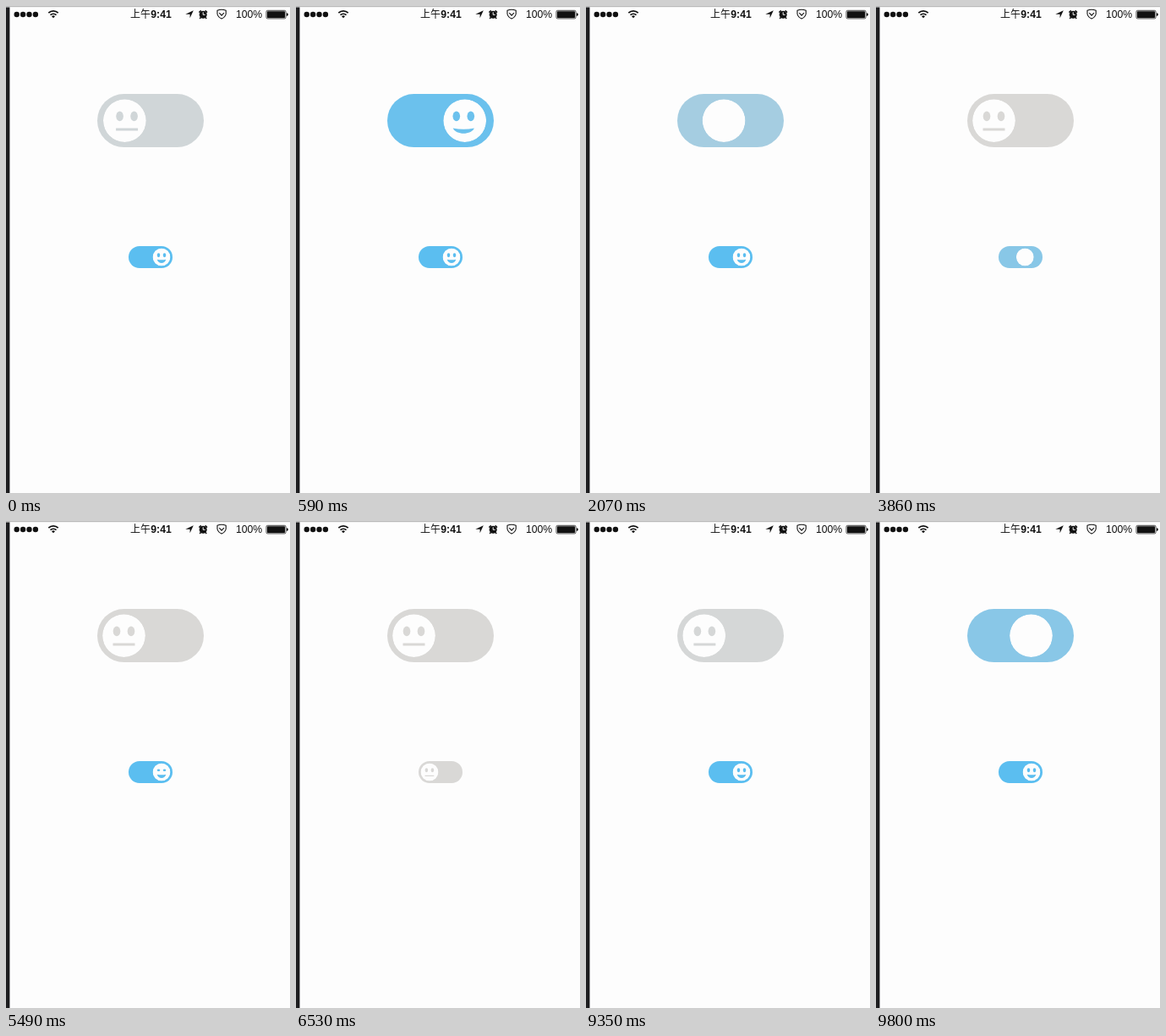
An HTML page for the animation above (9900 ms loop, 336 px wide and 576 px high).

```html
<!DOCTYPE html>
<html lang="zh">
<head>
<meta charset="utf-8">
<title>Face switches</title>
<style>
  html, body { margin: 0; width: 100%; height: 100%; overflow: hidden; background: #fdfdfd; }
  svg { display: block; width: 100%; height: 100%; }
  text { font-family: "Liberation Sans", Arial, sans-serif; font-size: 12.2px; fill: #111; }
  .cjk { font-family: "Noto Sans CJK SC", "Noto Sans CJK", sans-serif; font-size: 12px; }
  .line { fill: none; stroke: #111; }
</style>
</head>
<body>
<svg viewBox="0 0 336 576">
  <defs><clipPath id="knobClip"><circle r="25.4"/></clipPath></defs>
  <rect width="336" height="576" fill="#fdfdfd"/>
  <rect width="336" height="1.2" fill="#b9b9b9"/>
  <rect y="1.5" width="4.4" height="575" fill="#1c1c1e"/>

  <g fill="#111">
    <path d="M12.7 10h29.6" fill="none" stroke="#111" stroke-width="6.4" stroke-linecap="round" stroke-dasharray="0 7.4"/>
    <g class="line" stroke-width="1.7">
      <path d="M50.3 8.2a8.2 8.2 0 0 1 11.4 0M52.5 10.7a5 5 0 0 1 7 0"/>
    </g>
    <path d="M56 14.3l-2-2.1a2.9 2.9 0 0 1 4 0z"/>
    <text class="cjk" x="147" y="14.3">上午</text>
    <text x="171.3" y="14.2" font-weight="bold">9:41</text>
    <path d="M221.8 5.3L217.6 14.3V9.8H212.3z"/>
    <circle cx="233.2" cy="10.2" r="4.5"/>
    <path class="line" d="M228.4 7.6l2.4-2.2M238 7.6l-2.4-2.2M230.4 13.6l-1.2 1.3M236 13.6l1.2 1.3" stroke-width="1.5"/>
    <path d="M233.2 7.3v3h2.4" fill="none" stroke="#fdfdfd"/>
    <path class="line" d="M250 5.3q5-2.2 10.2 0v4.2q-.8 3.7-5.1 5.6q-4.3-1.9-5.1-5.6zM252.3 8.2l2.8 2.9l2.8-2.9" stroke-width="1.1"/>
    <text x="272" y="14.3">100%</text>
    <rect class="line" x="308" y="5.3" width="23" height="9.6" rx="1.5" stroke-width=".8"/>
    <rect x="309" y="6.3" width="21" height="7.6" rx=".6"/>
    <path d="M332 8.2q1.9.2 1.9 1.9t-1.9 1.9z"/>
  </g>
  <g id="switches"></g>
</svg>
<script>
const LOOP = 9900, STEP = 148.4, LEAD = 12;
const ON = [91, 190, 240], OFF = [217, 216, 214];
const TRAVEL = 31.5, SLIDE = 50, OVERSHOOT = 8;

// Each toggle is [start time, direction]: 1 turns on, -1 turns off.
const switches = [
  { x: 171, y: 135.6, scale: 1, duration: 740,
    toggles: [[-52, 1], [1645, -1], [9324, 1]] },
  { x: 171, y: 297, scale: 0.413, duration: 400,
    toggles: [[-2000, 1], [3714, -1], [4877, 1], [5950, -1], [7255, 1]] }
];

const clamp = v => Math.max(0, Math.min(1, v));
const ramp = (v, from, to) => clamp((v - from) / (to - from));
const ease = v => v * v * (3 - 2 * v);

function add(parent, tag, attrs = {}) {
  const node = document.createElementNS("http://www.w3.org/2000/svg", tag);
  for (const name in attrs) node.setAttribute(name, attrs[name]);
  return parent.appendChild(node);
}

function build(sw) {
  const root = add(document.getElementById("switches"), "g",
    { transform: `translate(${sw.x} ${sw.y}) scale(${sw.scale})` });
  sw.track = add(root, "rect", { x: -63, y: -31.5, width: 126, height: 63, rx: 31.5 });
  sw.knob = add(root, "g", { "clip-path": "url(#knobClip)" });
  add(sw.knob, "circle", { r: 25.4, fill: "#fdfdfd" });
  sw.face = add(sw.knob, "g");
  sw.eyes = [-8.5, 8.5].map(cx => add(sw.face, "ellipse", { cx, cy: -5.3, rx: 4.3 }));
  sw.mouth = add(sw.face, "path");
}

// The face leaves on the leading side, re-enters behind, overshoots and settles.
function faceShift(p) {
  if (p < 0.5) return SLIDE * ease(p / 0.5);
  if (p < 1) return -SLIDE + (SLIDE + OVERSHOOT) * ease((p - 0.5) / 0.5);
  return OVERSHOOT * (1 - ease(ramp(p, 1, 1.5)));
}

function mouthPath(smile) {
  if (smile === 0) return "M-13 8.9h26v3h-26z";
  const top = 11.5 - 5 * smile, depth = 2 + 8.5 * smile;
  return `M-12.6 ${top}Q0 ${top + 2.5} 12.6 ${top}` +
    `C9 ${top + depth * 4 / 3} -9 ${top + depth * 4 / 3} -12.6 ${top}z`;
}

function draw(sw, time) {
  const [start, dir] = sw.toggles.filter(([at]) => at <= time).pop();
  const p = (time - start) / sw.duration;
  const turningOn = dir > 0;
  const [from, to] = turningOn ? [OFF, ON] : [ON, OFF];
  const color = `rgb(${from.map((c, i) => Math.round(c + (to[i] - c) * clamp(p)))})`;

  const smile = turningOn ? ramp(p, 0.5, 1.25) : +(p < 0.5);
  const blink = turningOn ? Math.sin(Math.PI * ramp(p, 1.25, 1.6)) : 0;

  sw.track.setAttribute("fill", color);
  sw.face.setAttribute("fill", color);
  sw.knob.setAttribute("transform", `translate(${dir * TRAVEL * (2 * ease(clamp(p)) - 1)} 0)`);
  sw.face.setAttribute("transform", `translate(${dir * faceShift(p)} 0)`);
  sw.eyes.forEach(eye => eye.setAttribute("ry", 5.9 * (1 - 0.9 * blink)));
  sw.mouth.setAttribute("d", mouthPath(smile));
}

const origin = performance.now();
function tick() {
  const time = (performance.now() - origin) % LOOP;
  // The motion advances in held poses rather than continuously.
  const held = Math.floor((time + LEAD) / STEP) * STEP;
  switches.forEach(sw => draw(sw, held));
  requestAnimationFrame(tick);
}
switches.forEach(build);
tick();
</script>
</body>
</html>
```
